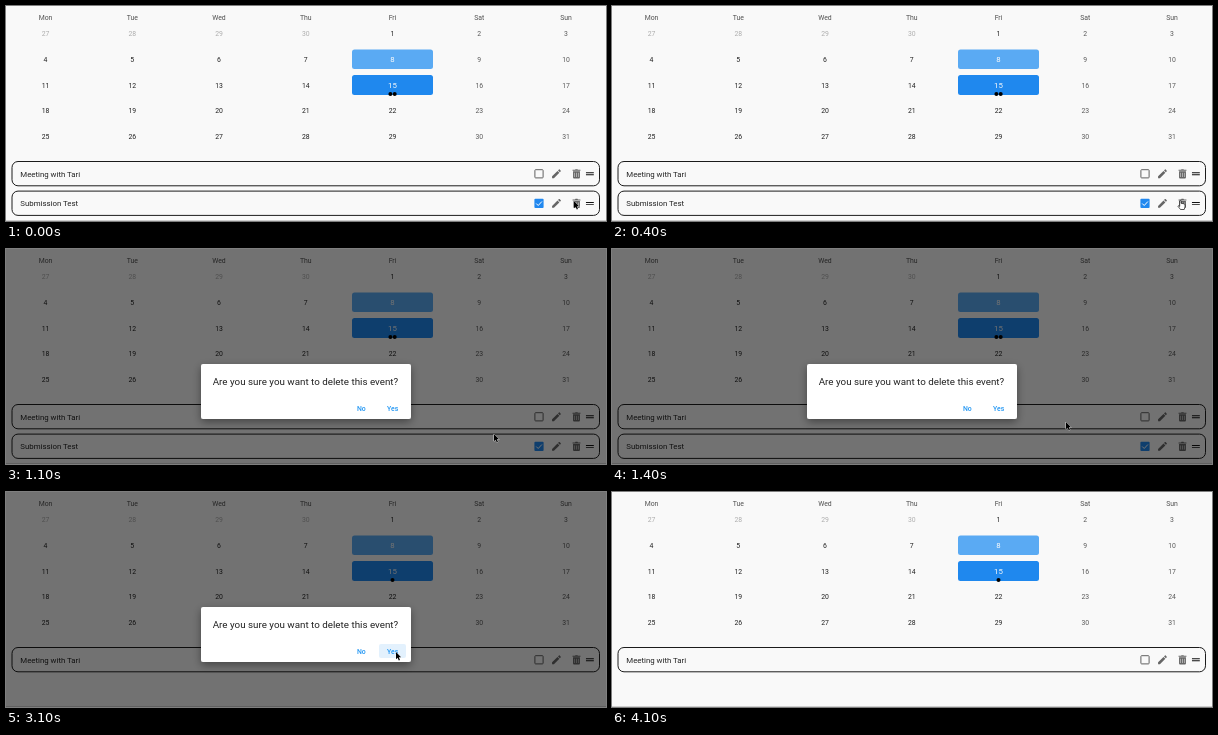
An HTML page that plays this animation: 600 px wide and 215 px high, repeating every 4.7 s.

```html
<!DOCTYPE html>
<html lang="en">
<head>
<meta charset="utf-8">
<title>Calendar event deletion</title>
<style>
  html, body { margin: 0; width: 100%; height: 100%; overflow: hidden; background: #f9f9f9; }
  svg { display: block; width: 600px; height: 215px; font-family: Roboto, sans-serif; }
  text { font-size: 6.87px; fill: #222; }
  .mid { text-anchor: middle; }
  .head { fill: #4f4f4f; }
  .outside { fill: #aeaeae; }
  .weekend { fill: #5a5a5a; }
  .marked { fill: #fafafa; font-size: 7.85px; }
  .title { font-size: 7.85px; }
  .question { font-size: 9.82px; }
  .action { fill: #2196f3; font-weight: 500; }
  .card { fill: none; stroke: #1c1c1c; }
  .icon { fill: #666; }

  .timed { animation: 4700ms step-end infinite; }
  #pair, #second { animation-name: before-delete; }
  #single { animation-name: after-delete; visibility: hidden; }
  #modal { animation-name: modal; visibility: hidden; }
  #press { animation-name: press; visibility: hidden; }
  #hand { animation-name: hand; visibility: hidden; }
  #arrow { animation-name: arrow; }

  @keyframes before-delete { 0% { visibility: visible } 63.82%, 100% { visibility: hidden } }
  @keyframes after-delete { 0% { visibility: hidden } 63.82%, 100% { visibility: visible } }
  @keyframes modal { 0% { visibility: hidden } 14.89% { visibility: visible } 68.08%, 100% { visibility: hidden } }
  @keyframes press { 0% { visibility: hidden } 59.57% { visibility: visible } 68.08%, 100% { visibility: hidden } }
  @keyframes hand { 0% { visibility: hidden } 8.51% { visibility: visible } 14.89%, 100% { visibility: hidden } }
  @keyframes arrow {
    0% { transform: translate(568px, 195px); visibility: visible }
    8.51% { transform: translate(568px, 195px); visibility: hidden }
    14.89% { transform: translate(568px, 195px); visibility: visible }
    21.27% { transform: translate(527px, 192px) }
    23.4% { transform: translate(488px, 185px) }
    27.65% { transform: translate(470px, 179px) }
    29.78% { transform: translate(454px, 173px) }
    36.17% { transform: translate(446px, 171px) }
    38.29% { transform: translate(432px, 168px) }
    40.42% { transform: translate(416px, 164px) }
    42.55% { transform: translate(402px, 162px) }
    44.68% { transform: translate(394px, 160px) }
    46.8% { transform: translate(390px, 160px); visibility: visible }
    87.23%, 100% { transform: translate(390px, 160px); visibility: hidden }
  }
</style>
</head>
<body>
<svg viewBox="0 0 600 215">
  <defs>
    <filter id="shadow" x="-10%" y="-30%" width="120%" height="170%">
      <feDropShadow dx="0" dy="3" stdDeviation="4" flood-opacity=".4"/>
    </filter>
    <g id="tools">
      <rect class="card" x="6" y="-12.3" width="587.5" height="24.3" rx="6"/>
      <path class="icon" transform="translate(544.6 -5.9) scale(.491)" d="M3 17.25V21h3.75L17.81 9.94l-3.75-3.75L3 17.25zM20.71 7.04c.39-.39.39-1.02 0-1.41l-2.34-2.34c-.39-.39-1.02-.39-1.41 0l-1.83 1.83 3.75 3.75 1.83-1.83z"/>
      <path class="icon" fill-rule="evenodd" transform="translate(564.6 -5.9) scale(.491)" d="M4 4h5l1-1.5h4L15 4h5v2H4zM5 7h14v12.5a2 2 0 0 1-2 2H7a2 2 0 0 1-2-2zM8 10v8.5h1V10zM11.5 10v8.5h1V10zM15 10v8.5h1V10z"/>
      <path fill="#111" transform="translate(578 -5.9) scale(.491)" d="M20 9H4v2h16zM4 15h16v-2H4z"/>
    </g>
  </defs>

  <rect width="600" height="215" fill="#f9f9f9"/>
  <rect y="214" width="600" height="1" fill="#cfcfcf"/>
  <rect x="346" y="43.5" width="81" height="19.5" rx="2.5" fill="#5aaaf3"/>
  <rect x="346" y="69" width="81" height="20" rx="2.5" fill="#1f88ee"/>
  <g id="calendar"></g>
  <g id="pair" class="timed"><circle cx="384.4" cy="88" r="2"/><circle cx="388.7" cy="88" r="2"/></g>
  <circle id="single" class="timed" cx="386.5" cy="88" r="2"/>

  <g transform="translate(0 167.8)">
    <use href="#tools"/>
    <text class="title" x="14.3" y="2.8">Meeting with Tari</text>
    <rect x="528.9" y="-4.1" width="8.2" height="8.2" rx=".7" fill="none" stroke="#606060"/>
  </g>
  <g id="second" class="timed" transform="translate(0 197.4)">
    <use href="#tools"/>
    <text class="title" x="14.3" y="2.8">Submission Test</text>
    <rect x="528.4" y="-4.6" width="9.2" height="9.2" rx="1" fill="#2188ef"/>
    <path d="M530.2 .1l2 2 3.7-4" fill="none" stroke="#fff"/>
  </g>

  <g id="modal" class="timed">
    <rect width="600" height="215" fill-opacity=".54"/>
    <rect x="195" y="115" width="210" height="55" rx="2" fill="#fff" filter="url(#shadow)"/>
    <text class="question" x="206.7" y="136.4">Are you sure you want to delete this event?</text>
    <rect id="press" class="timed" x="373" y="152" width="27" height="14" rx="2" fill="#e3f1fd"/>
    <text class="action mid" x="355.3" y="161.5">No</text>
    <text class="action mid" x="386.6" y="161.5">Yes</text>
  </g>

  <path id="hand" class="timed" transform="translate(565.5 194)" fill="#fff" stroke="#111" stroke-width=".7" d="M2.2 5.5V1a.7.7 0 0 1 1.4 0V3.3L6.6 3.8Q7.5 4 7.5 5V7L6.7 9.5H3L.5 6.3Q.5 5 2.2 6.4z"/>
  <path id="arrow" class="timed" stroke="#fff" stroke-width=".7" paint-order="stroke" d="M0 0V7.2L1.6 5.7 2.8 8.4 4 7.9 2.8 5.3H5.1z"/>
</svg>
<script>
  const calendar = document.getElementById("calendar");

  function label(value, column, centerY, kind) {
    const text = document.createElementNS("http://www.w3.org/2000/svg", "text");
    text.setAttribute("class", "mid " + kind);
    text.setAttribute("x", 39.5 + column * 86.75);
    text.setAttribute("y", centerY + (kind === "marked" ? 2.8 : 2.5));
    text.textContent = value;
    calendar.append(text);
  }

  ["Mon", "Tue", "Wed", "Thu", "Fri", "Sat", "Sun"].forEach((name, i) => label(name, i, 11, "head"));

  for (let cell = 0; cell < 35; cell++) {
    const column = cell % 7;
    const day = cell < 4 ? 27 + cell : cell - 3;
    const kind = cell < 4 ? "outside"
      : day === 8 || day === 15 ? "marked"
      : column > 4 ? "weekend" : "";
    label(day, column, 27.8 + Math.floor(cell / 7) * 25.6, kind);
  }
</script>
</body>
</html>
```
